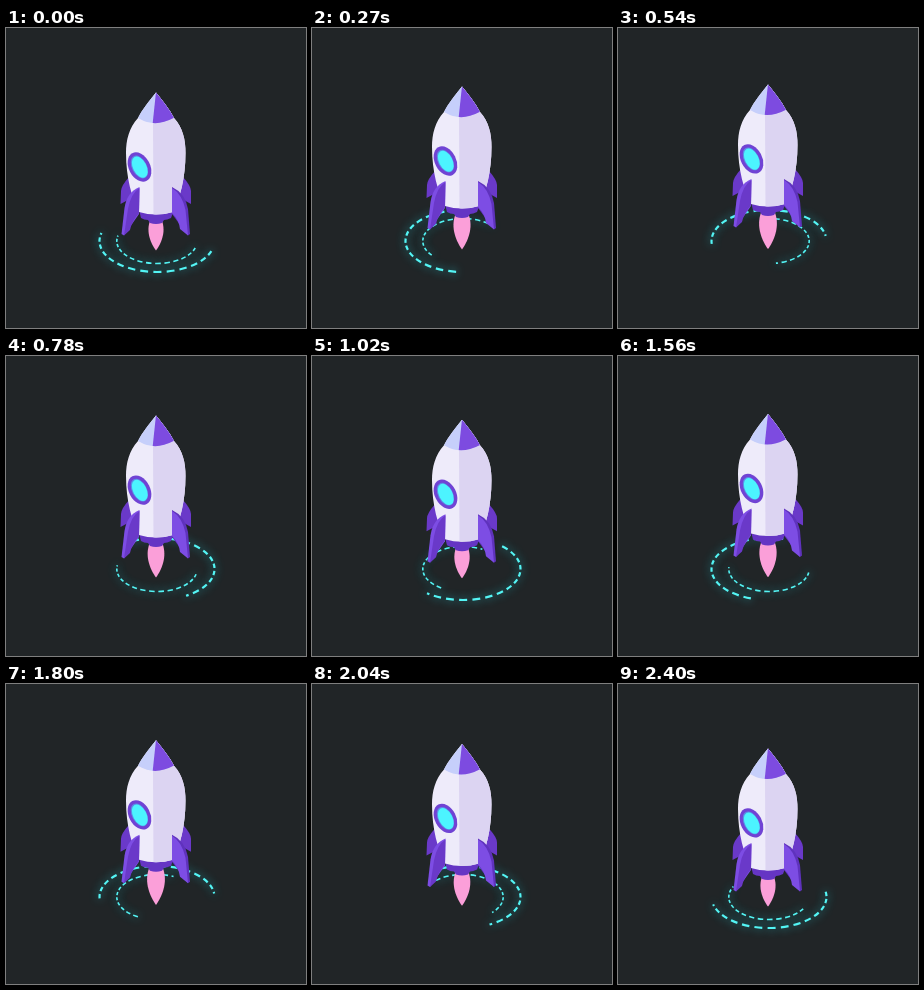
These frames come from a looping animation (300 px wide and 300 px high, 2.43 s). An HTML page with a canvas:

```html
<!DOCTYPE html>
<html lang="en">
<head>
<meta charset="utf-8">
<title>Rocket</title>
<style>
  html, body { margin: 0; width: 100%; height: 100%; overflow: hidden; background: #212527; }
  canvas { display: block; width: 300px; height: 300px; }
</style>
</head>
<body>
<canvas id="stage"></canvas>
<script>
const LOOP = 2430, STEP = 30, BOB = 1250, RISE = 8.2;
const canvas = document.getElementById('stage');
const ctx = canvas.getContext('2d');
const ratio = window.devicePixelRatio || 1;
canvas.width = canvas.height = 300 * ratio;

const rings = [
  { rx: 57.5, ry: 31, period: 1250, head: 195, width: 2.2 },
  { rx: 40.2, ry: 22.5, period: 790, head: 194, width: 1.6 }
];
// Dash pattern in degrees; the leading dash is cut to a dot
const DASHES = 14, PITCH = 13.3, DASH = 8, DOT = 3;

const body = new Path2D('M150 64.500C143 73 136 82 132 90C123 100 120 112 120 125C120 150 126 170 133 184Q150 189 167 184C174 170 179.500 150 179.500 125C179.500 112 177 100 168 90C164 82 157 73 150 64.500Z');
const shade = new Path2D('M150 60L147 95L147.500 192H190V60Z');
const nose = new Path2D('M150 60L128 88L133 90.5Q149 100 167.5 90L172 88Z');
const noseShade = new Path2D('M150 64L146.5 97L172 97V60Z');

// Pieces behind and in front of the hull: [colour, path]
const back = [
  ['#6a39c9', 'M123 149Q115 158 115 163L114.500 176L124 171L128 165Z'],
  ['#6a39c9', 'M177 149Q185 158 185 163L185 176L176 171L172 165Z'],
  ['#6535c4', 'M133 182Q150 190 168 182L165 190Q161 192 158 192L156 195Q150 197 144 195L142 192Q138 192 135 190Z']
].map(toPath);
const front = [
  ['#7d4de4', 'M133.500 159Q121 164 118.500 180L115.500 206L118 207.500L133 186Z'],
  ['#6a39c9', 'M133.500 160Q125 165 122 181L118 207.500L124 202Q126 193 133 185Z'],
  ['#5f32bd', 'M166 159Q179 165 182 181L184 206L182 207.500L166 186Z'],
  ['#7d4de4', 'M166 160Q176 166 179.500 182L182 207.500L174 201Q173 192 166 185Z']
].map(toPath);

function toPath([color, d]) {
  return [color, new Path2D(d)];
}

function fill(color, path) {
  ctx.fillStyle = color;
  ctx.fill(path);
}

// cubic-bezier(.25, .1, .25, 1)
function ease(x) {
  let lo = 0, hi = 1;
  for (let i = 0; i < 24; i++) {
    const m = (lo + hi) / 2, n = 1 - m;
    if (.75 * m * n + m * m * m < x) lo = m; else hi = m;
  }
  const n = 1 - lo;
  return .3 * lo * n * n + 3 * lo * lo * n + lo ** 3;
}

function bob(t) {
  const p = t % BOB / BOB * 2;
  return RISE * (p < 1 ? ease(p) : 1 - ease(p - 1));
}

function drawRing(r, t) {
  const rad = Math.PI / 180;
  const head = r.head + 360 * t / r.period;
  ctx.save();
  ctx.strokeStyle = '#55f5f5';
  ctx.lineWidth = r.width;
  ctx.shadowColor = 'rgba(40, 225, 235, .8)';
  ctx.shadowBlur = 8 * ratio;
  for (let i = 0; i < DASHES; i++) {
    const from = head - DOT - i * PITCH;
    const to = Math.min(head, from + DASH);
    ctx.beginPath();
    ctx.ellipse(151, 213, r.rx, r.ry, 0, from * rad, to * rad);
    ctx.stroke();
  }
  ctx.restore();
}

function drawFlame(lift) {
  const top = 192 - lift, tip = 222.5 - lift * .18, h = tip - top;
  const w = 7.6 + lift * .17;
  ctx.fillStyle = '#fb9fd9';
  ctx.beginPath();
  ctx.moveTo(150 - w * .75, top);
  ctx.bezierCurveTo(150 - w * 1.4, top + h * .4, 150 - w * .6, top + h * .8, 150, tip);
  ctx.bezierCurveTo(150 + w * .6, top + h * .8, 150 + w * 1.4, top + h * .4, 150 + w * .75, top);
  ctx.fill();
}

function drawOval(color, x, y, rx, ry) {
  ctx.fillStyle = color;
  ctx.beginPath();
  ctx.ellipse(x, y, rx, ry, -.48, 0, Math.PI * 2);
  ctx.fill();
}

function drawRocket(lift) {
  ctx.save();
  ctx.translate(0, -lift);
  back.forEach(p => fill(...p));
  ctx.save();
  ctx.clip(body);
  ctx.fillStyle = '#eeebfa';
  ctx.fillRect(115, 60, 70, 135);
  fill('#dcd4f2', shade);
  ctx.clip(nose);
  ctx.fillStyle = '#c6cffb';
  ctx.fillRect(115, 60, 70, 40);
  fill('#7d4be0', noseShade);
  ctx.restore();
  drawOval('#7043d4', 133.5, 139, 10.6, 15.6);
  drawOval('#5a8fe6', 133.4, 139, 7.4, 12.2);
  drawOval('#4cf4ff', 133.8, 139.2, 6.7, 11.4);
  front.forEach(p => fill(...p));
  ctx.restore();
}

function draw(now) {
  const t = Math.floor(now % LOOP / STEP) * STEP;
  const lift = bob(t);
  ctx.setTransform(ratio, 0, 0, ratio, 0, 0);
  ctx.fillStyle = '#212527';
  ctx.fillRect(0, 0, 300, 300);
  rings.forEach(r => drawRing(r, t));
  drawFlame(lift);
  drawRocket(lift);
}

const start = performance.now();
function tick() {
  draw(performance.now() - start);
  requestAnimationFrame(tick);
}
tick();
</script>
</body>
</html>
```
